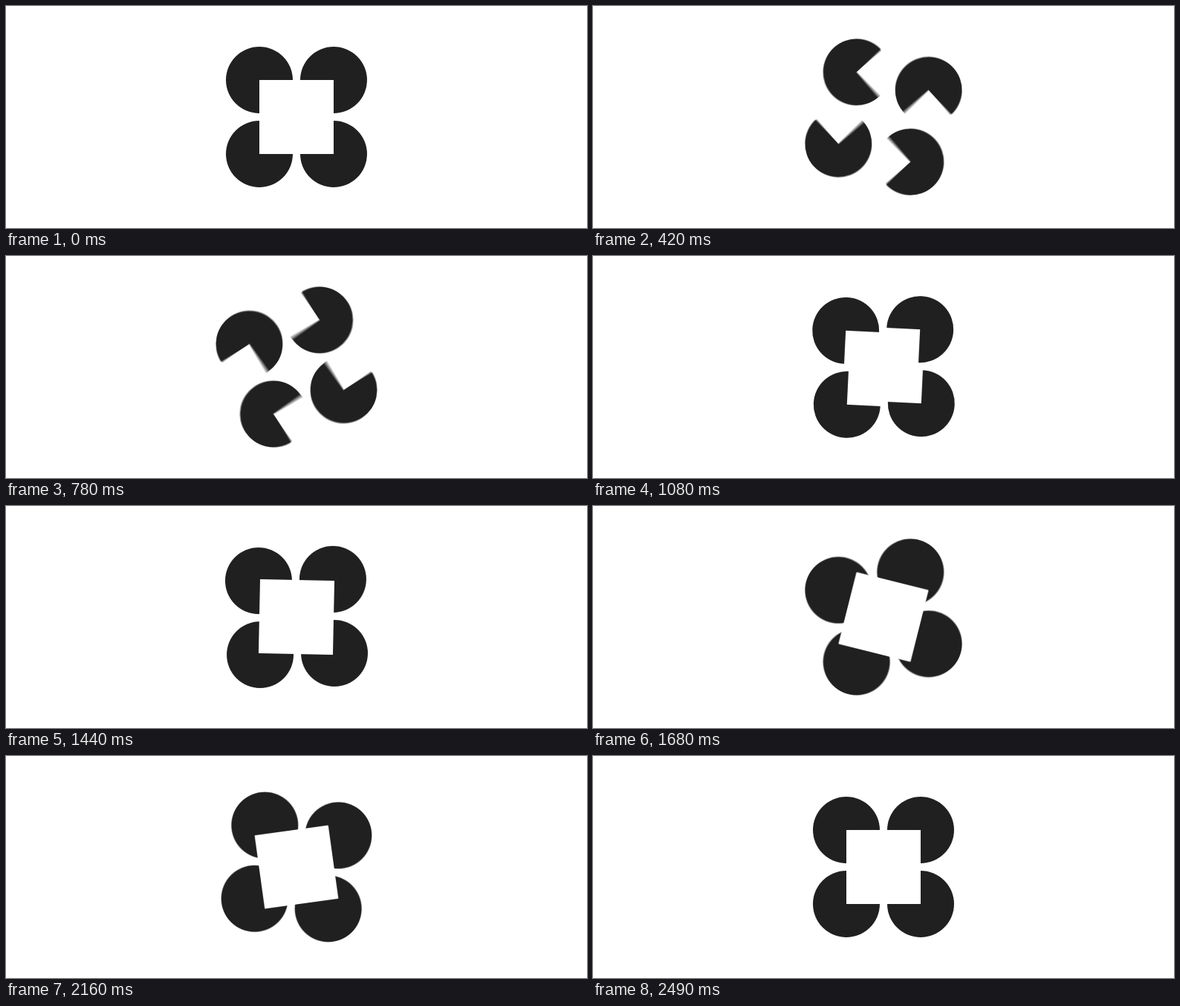
These frames come from a looping animation (782x300 px, 2.52 s). An HTML page with a canvas:

```html
<!DOCTYPE html>
<html lang="en">
<head>
<meta charset="utf-8">
<title>Illusory square</title>
<style>
  html, body { margin: 0; width: 100%; height: 100%; overflow: hidden; background: #fff; }
  canvas { display: block; }
</style>
</head>
<body>
<canvas id="stage" width="782" height="300"></canvas>
<script>
const W = 782, H = 300;
const LOOP = 2520, HALF = LOOP / 2, STEP = 30;
const SHUTTER = 18, SAMPLES = 8;
const INK = '#202020', PAPER = '#fff';
const SIDE = 50, RADIUS = 45, ORBIT = SIDE * Math.SQRT2;
const QUARTER = Math.PI / 2;

const ctx = document.getElementById('stage').getContext('2d');
const layer = document.createElement('canvas');
layer.width = W;
layer.height = H;
const pen = layer.getContext('2d');

const ease = p => p < 0.5 ? 4 * p ** 3 : 1 - 4 * (1 - p) ** 3;

function eachDisc(turn, draw) {
  for (let i = 0; i < 4; i++) {
    const a = (i + 0.5) * QUARTER + turn;
    pen.beginPath();
    draw(ORBIT * Math.cos(a), ORBIT * Math.sin(a), i);
    pen.fill();
  }
}

// Discs orbit one way while their cut-out quarters spin the other way.
function spinDiscs(turn) {
  eachDisc(turn, (x, y, i) => {
    const mouth = (i + 2) * QUARTER - 3 * turn;
    pen.moveTo(x, y);
    pen.arc(x, y, RADIUS, mouth + QUARTER, mouth + 4 * QUARTER);
    pen.closePath();
  });
}

// Whole discs orbit back underneath a counter-rotating white square.
function spinSquare(turn) {
  eachDisc(-turn, (x, y) => pen.arc(x, y, RADIUS, 0, 4 * QUARTER));
  pen.rotate(turn);
  pen.fillStyle = PAPER;
  pen.fillRect(-SIDE, -SIDE, 2 * SIDE, 2 * SIDE);
}

function drawScene(t) {
  pen.setTransform(1, 0, 0, 1, 0, 0);
  pen.fillStyle = PAPER;
  pen.fillRect(0, 0, W, H);
  pen.translate(W / 2, H / 2);
  pen.fillStyle = INK;
  const turn = QUARTER * ease(t % HALF / HALF);
  (t < HALF ? spinDiscs : spinSquare)(turn);
}

// Motion blur: average several moments of the open shutter.
function render(time) {
  const t = Math.floor((time % LOOP + 0.5) / STEP) * STEP % LOOP;
  ctx.globalCompositeOperation = 'source-over';
  ctx.globalAlpha = 1;
  ctx.fillStyle = '#000';
  ctx.fillRect(0, 0, W, H);
  ctx.globalCompositeOperation = 'lighter';
  ctx.globalAlpha = 1 / SAMPLES;
  for (let i = 0; i < SAMPLES; i++) {
    drawScene(t + SHUTTER * i / SAMPLES);
    ctx.drawImage(layer, 0, 0);
  }
}

const start = performance.now();
function tick() {
  render(Math.max(0, performance.now() - start));
  requestAnimationFrame(tick);
}
tick();
</script>
</body>
</html>
```
